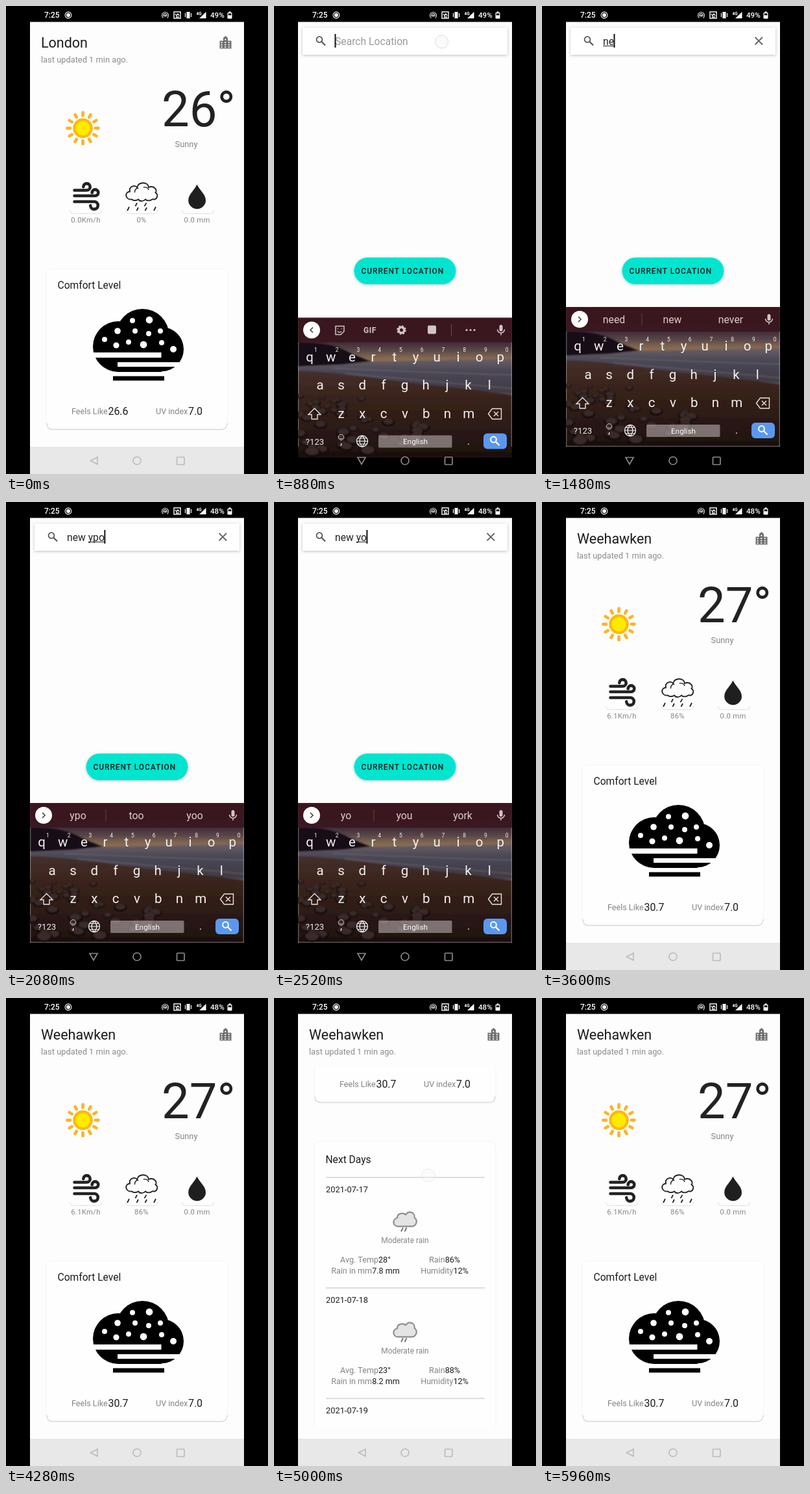
These frames come from a looping animation (404 px wide and 720 px high, 6000 ms). An HTML page:

```html
<!DOCTYPE html>
<html lang="en">
<head>
<meta charset="utf-8">
<title>Weather app</title>
<style>
  html, body { margin: 0; width: 100%; height: 100%; overflow: hidden; background: #000; }
  svg { display: block; width: 404px; height: 720px; font-family: Roboto, "Noto Sans", sans-serif; }
  text { white-space: pre; }
</style>
</head>
<body>
<svg id="stage" viewBox="0 0 404 720" xmlns="http://www.w3.org/2000/svg"></svg>
<script>
const LOOP = 6000;
const GREY = '#858585', INK = '#1c1c1c';

const text = (x, y, size, fill, body, extra = '') =>
  `<text x="${x}" y="${y}" font-size="${size}" fill="${fill}" ${extra}>${body}</text>`;
const mid = (x, y, size, fill, body, extra = '') => text(x, y, size, fill, body, `text-anchor="middle" ${extra}`);
const rect = (x, y, w, h, fill, extra = '') =>
  `<rect x="${x}" y="${y}" width="${w}" height="${h}" fill="${fill}" ${extra}/>`;
const circle = (x, y, r, fill, extra = '') => `<circle cx="${x}" cy="${y}" r="${r}" fill="${fill}" ${extra}/>`;
const line = (d, stroke, width, extra = '') =>
  `<path d="${d}" fill="none" stroke="${stroke}" stroke-width="${width}" ${extra}/>`;
const fillPath = (d, fill) => `<path d="${d}" fill="${fill}"/>`;
const group = (id, body, extra = '') => `<g id="${id}" ${extra}>${body}</g>`;
const range = (n, fn) => Array.from({ length: n }, (_, i) => fn(i)).join('');
const lens = (x, y, color, w = 1.8) =>
  circle(x - 1.5, y - 1.5, 4.4, 'none', `stroke="${color}" stroke-width="${w}"`) +
  line(`M${x + 2} ${y + 2}l5.500 5.500`, color, w + .3);

function statusBar() {
  return text(59, 18, 12, '#fff', '7:25', 'font-weight="500"') +
    circle(96, 14, 4.9, 'none', 'stroke="#fff" stroke-width="1.1"') + circle(96, 14, 3, '#fff') +
    line('M242.500 18.500a5 5 0 1 1 6 0M243.500 16a2.600 2.600 0 1 1 4 0', '#ddd', 1.2) + circle(245.5, 15, 1.3, '#fff') +
    rect(259, 9, 10, 10, 'none', 'stroke="#fff" stroke-width="1.4"') +
    line('M261 12l2 3 2-3 2 3M262 17h5', '#fff', 1.3) +
    rect(278.5, 9, 5, 10, '#fff') + line('M276.500 11v6M285.500 11v6', '#fff', 1.2) +
    fillPath('M298 19L308.500 9V19Z', '#fff') +
    text(293.5, 14, 6.5, '#fff', '4G', 'font-weight="700"') +
    text(315, 18, 11.6, '#fff', '49%', 'font-weight="500" id="battery"') +
    rect(341.5, 10, 7, 9.5, '#fff', 'rx="1"') + rect(343.5, 8.5, 3, 2, '#fff') +
    rect(342.7, 11.3, 4.6, 3, '#111');
}

function cityIcon() {
  const windows = range(3, r => range(3, c => rect(331.6 + c * 5.6, 55.3 + r * 3.5, 2, 1.8, '#fff')));
  return fillPath('M329.500 53.500H335V49L338.500 46L342 49V53.500H347.500V65.500H329.500Z', '#707070') +
    windows + rect(337.4, 50.5, 2, 2, '#fff');
}

function sun() {
  const rays = range(12, i => `<g transform="rotate(${i * 30} 118.500 188)">` +
    line('M118.500 168.500V164', '#fbb42c', 4.8, 'stroke-linecap="round"') + '</g>');
  return rays + circle(118.5, 188, 15.3, '#fdb913') + circle(118.5, 188, 11, '#ffea00');
}

function smallIcons() {
  const trays = [123, 209, 296].map(x =>
    line(`M${x - 25} 314q1 5.500 7 5.500h36q6 0 7-5.500`, '#e0e0e0', 1.1)).join('');
  const wind = line('M105.500 283.500H124.500a5.200 5.200 0 1 0-5.200-5.200M105.500 292H137.500a4.800 4.800 0 1 0-4.800-4.800' +
    'M105.500 301H136a5.800 5.800 0 1 1-5.800 6', '#222', 4.6, 'stroke-linecap="round"');
  const cloud = line('M194 297.500C184 299 182 286 191 285.500C189 277 199 275 202 279C205 269.500 219 270.500 220 279' +
    'C228 275.500 234 283 230.500 287C236 291 232.500 299 226 297.200C222 300 217 300 215 297.500C212 301 206 301 204 297.500C200 300 197 300 194 297.500Z', '#222', 1.9) +
    line('M198.500 287q0-7 6-7M212 279q7-1 8 4', '#222', 1.4) +
    line('M190 309l-3 6M202 303l-2.500 5M204 310l-2.500 5M216.500 303l-3 5M217 310l-2.500 5M231 309l-3 6', '#222', 1.7);
  const drop = fillPath('M294.500 274.500C298 283 308 289.500 308 299A13.400 13.200 0 0 1 281.200 299C281.200 289.500 291 283 294.500 274.500Z', '#1f1f1f');
  return trays + wind + cloud + drop;
}

function comfortCloud() {
  const dots = [[152, 513, 4], [172, 500, 4.8], [195, 484, 4], [221, 483, 5.4], [199, 500, 4], [238, 500, 4],
    [220, 504, 4], [170, 522, 4.6], [189, 517, 4], [212, 521, 5.4], [240, 518, 4], [258, 528, 5]];
  return circle(173, 524, 39, '#000') + circle(210.5, 507, 41, '#000') + circle(240, 528, 34, '#000') +
    rect(173, 520, 67, 43, '#000') + dots.map(d => circle(...d, '#fff')).join('') +
    rect(133, 533, 106.5, 8, '#fff') + rect(172, 548, 104, 7, '#fff') + rect(165, 569.5, 79, 6.8, '#000');
}

const card = (y, h) => rect(62, y, 280, h, '#fefefe', 'rx="9" stroke="#f4f4f4"') +
  line(`M63 ${y + h - 9}q0 9.500 9 9.500h260q9 0 9-9.500`, '#d9d9d9', 1.4);

const pair = (x, y, label, value) =>
  mid(x, y, 12.6, GREY, `${label}<tspan fill="${INK}">${value}</tspan>`);

function day(i, date, temp, mm, rain) {
  const y = 767 + i * 170;
  return rect(80, y - 1, 245, 1.6, '#d6d6d6') + text(80, y + 23, 12.85, INK, date) +
    `<path d="M191 ${y + 75}c-8 0-9-11-1-13c0-8 10-8 13-5c6-8 15-2 13.500 4.500c6 4 3 13.500-4 13.500Z" fill="#e4e4e4" stroke="#8f8f8f" stroke-width="2.2"/>` +
    line(`M199 ${y + 77}l-3 6M204.500 ${y + 77}l-3 6`, '#777', 1.9) +
    mid(202, y + 101, 11.9, GREY, 'Moderate rain') +
    pair(141, y + 131, 'Avg. Temp', temp) + pair(263, y + 131, 'Rain', rain) +
    pair(141, y + 148, 'Rain in mm', mm) + pair(263, y + 148, 'Humidity', '12%');
}

function weather() {
  const label = (id, x) => mid(x, 333, 11.24, GREY, '', `id="${id}" letter-spacing=".35"`);
  const content = sun() +
    text(240, 185, 76, '#222', '', 'id="temp"') + mid(278, 217, 12.85, GREY, 'Sunny') +
    smallIcons() + label('wind', 123) + label('rain', 209) + mid(294.5, 333, 11.24, GREY, '0.0 mm', 'letter-spacing=".35"') +
    card(404, 247) + text(79.5, 435, 15.6, INK, 'Comfort Level') + comfortCloud() +
    text(101, 628, 12.6, GREY, 'Feels Like') + text(157.5, 629, 15.9, INK, '', 'id="feels"') +
    text(231, 628, 12.6, GREY, 'UV index') + text(281, 629, 15.9, INK, '7.0') +
    card(711, 570) + text(79.5, 745, 15.6, INK, 'Next Days') +
    day(0, '2021-07-17', '28°', '7.8 mm', '86%') +
    day(1, '2021-07-18', '23°', '8.2 mm', '88%') +
    day(2, '2021-07-19', '25°', '4.1 mm', '82%');
  return text(54, 64, 21.5, INK, '', 'id="city"') + text(54, 86.5, 12.85, '#8c8c8c', 'last updated 1 min ago.') +
    cityIcon() + `<g clip-path="url(#scrollArea)">${group('content', content)}</g>`;
}

function search() {
  return rect(44, 33, 316, 42, '#fff', 'filter="url(#shadow)"') + lens(71.5, 53, '#555') +
    text(94, 59.5, 15.7, '#9a9a9a', 'Search Location', 'id="hint"') +
    text(94, 59.5, 15.7, '#222', '', 'id="query"') +
    rect(0, 61, 0, 1, '#222', 'id="underline"') + rect(93.5, 43, 2, 21, '#111', 'id="caret"') +
    line('M328.500 48l11.500 11.500M340 48l-11.500 11.500', '#666', 1.8, 'id="clear"') +
    rect(123.5, 387, 157, 41, '#06e5cf', 'rx="20.500" filter="url(#shadow)"') +
    text(134.5, 412, 11.9, '#0b1a1a', 'CURRENT LOCATION', 'font-weight="500" letter-spacing="1"');
}

// Dusk beach: low sun band, dark headland, wet sand and scattered stones
function beach() {
  let seed = 11;
  const rnd = () => (seed = seed * 16807 % 2147483647) / 2147483647;
  const rocks = range(44, i => {
    const y = 584 + i * 2, spread = y > 622 ? 190 : 110;
    const x = 40 + rnd() * spread, r = 4 + i * .12 + rnd() * 5;
    const oval = (dy, k, c) => `<ellipse cx="${x}" cy="${y + dy}" rx="${r * k}" ry="${r * .6 * k}" fill="${c}"/>`;
    return oval(0, 1, '#150d0d') + oval(-r * .14, .74, '#3a2b29');
  });
  const picture = rect(37, 463, 330, 215, 'url(#sky)') +
    fillPath('M37 533L367 526V580L37 552Z', 'url(#sea)') +
    fillPath('M37 501C70 500 95 505 112 514C125 521 138 525 150 530L105 535L37 538Z', '#181114') +
    fillPath('M37 545C100 546 150 556 200 562S320 574 367 582V678H37Z', 'url(#sand)') +
    line('M90 541Q210 546 367 551M110 549Q230 560 367 572', '#80757a', 1.5, 'opacity=".5"') + rocks;
  return `<g clip-path="url(#keys)"><g filter="url(#soft)">${picture}</g></g>` +
    rect(37, 463, 330, 38, '#3a161d', 'opacity=".85"');
}

function keyboard() {
  const key = (x, y, c, s = 20.5) => mid(x, y, s, '#f4f1ef', c);
  const row = (chars, x, step, y) => [...chars].map((c, i) => key(x + i * step, y, c)).join('');
  const digits = [...'1234567890'].map((c, i) => key(64.5 + i * 32.75, 515.5, c, 8.5)).join('');
  const pale = '#d0c6c6';
  const mic = rect(347.5, 474, 5, 10, pale, 'rx="2.500"') + line('M344.500 481a5.500 5.500 0 0 0 11 0M350 486.500v3.500', pale, 1.5);
  const gear = circle(196.5, 482, 4.3, 'none', `stroke="${pale}" stroke-width="3.500"`) +
    circle(196.5, 482, 6.3, 'none', `stroke="${pale}" stroke-width="2" stroke-dasharray="2.600 2.350"`);
  const tools = line('M60 478l-4 4 4 4', '#444', 1.7) +
    line('M95 476h13v8l-5 5h-8ZM98 480h1M104 480h1M98 484q3 3 6 0', pale, 1.5) +
    mid(148, 486.5, 12, pale, 'GIF', 'font-weight="700" letter-spacing=".5"') + gear +
    rect(237, 475, 13, 13, pale, 'rx="2"') + rect(273, 473, 1, 18, '#6b4f54') +
    [297, 303, 309].map(x => circle(x, 482, 1.6, pale)).join('');
  const words = line('M56 478l4 4-4 4', '#444', 1.7) + rect(153.5, 473, 1, 18, '#604449') +
    [111, 201, 291].map((x, i) => mid(x, 487.5, 15.8, '#d8cece', '', `id="word${i}"`)).join('');
  return beach() + circle(58, 482, 13, '#fff') + group('tools', tools) + group('words', words) + mic +
    row('qwertyuiop', 55, 32.7, 530) + digits + row('asdfghjkl', 71, 32.65, 573.5) + row('zxcvbnm', 103.5, 32.8, 617) +
    line('M62.500 602.500l9.500 9.500h-5v7h-9v-7h-5Z', '#e8e3e1', 1.4) +
    line('M330.500 611l6-8h14v16h-14ZM339 607.500l7 7M346 607.500l-7 7', '#e8e3e1', 1.4) +
    key(63, 658, '?123', 13.2) + key(103.5, 658, ',', 16) +
    circle(103.5, 647, 4.2, 'none', 'stroke="#e8e3e1"') + line('M101 648q2.500 3 5 0M102 645.500v1M105 645.500v1', '#e8e3e1', 1) +
    circle(136, 653, 8.5, 'none', 'stroke="#eee" stroke-width="1.400"') +
    line('M127.500 653h17M129.500 648.500h13M129.500 657.500h13M136 644.500q-8 8.500 0 17q8-8.500 0-17', '#eee', 1.2) +
    rect(161, 644, 113.5, 19, '#b9aeae', 'rx="1.500" opacity=".6"') + mid(218, 657.5, 11.8, '#fff', 'English') +
    key(300, 658, '.', 17) + rect(323, 641, 36, 24, '#5a98f0', 'rx="6"') + lens(340, 652, '#fff', 2);
}

const navIcons = (id, color, triangle) => group(id,
  line(triangle, color, 1.7) + circle(202, 699.5, 6, 'none', `stroke="${color}" stroke-width="1.700"`) +
  rect(263.5, 694, 11.5, 11.5, 'none', `rx="1" stroke="${color}" stroke-width="1.700"`));

const gradient = (id, ...stops) => `<linearGradient id="${id}" x1="0" y1="0" x2="0" y2="1">` +
  stops.map(([at, c]) => `<stop offset="${at}" stop-color="${c}"/>`).join('') + '</linearGradient>';

document.getElementById('stage').innerHTML = `<defs>
  <clipPath id="scrollArea"><rect x="37" y="106" width="330" height="554"/></clipPath>
  <clipPath id="keys"><rect x="37" y="463" width="330" height="215"/></clipPath>
  <filter id="soft"><feGaussianBlur stdDeviation="1"/></filter>
  <filter id="shadow" x="-10%" y="-20%" width="120%" height="150%"><feDropShadow dx="0" dy="1" stdDeviation="2" flood-opacity=".25"/></filter>
  ${gradient('sky', [0, '#3a161d'], [.17, '#3d2a34'], [.23, '#57454a'], [.29, '#86694f'], [.33, '#8c7257'], [.4, '#5d5560'])}
  ${gradient('sea', [0, '#6b6066'], [.35, '#4a4856'], [1, '#3f3a44'])}
  ${gradient('sand', [0, '#45302b'], [.3, '#3a241b'], [.7, '#2a1914'], [1, '#1c100f'])}
  </defs>` +
  rect(0, 0, 404, 720, '#000') + rect(37, 24.5, 330, 653.5, '#fdfdfd') + statusBar() +
  group('weather', weather()) + group('search', search()) +
  group('lightNav', rect(37, 678, 330, 42, '#e8e8e8') + navIcons('lightIcons', '#bcbcbc', 'M141 694v11l-10.500-5.500Z')) +
  group('darkNav', rect(37, 678, 330, 42, '#000') + group('keyboard', keyboard()) +
    navIcons('darkIcons', '#8b8888', 'M129 694.500h12l-6 10.500Z')) +
  circle(0, 0, 10, '#f6f6f6', 'id="touch" stroke="#b5b5b5" stroke-width="1"');

const ui = {};
document.querySelectorAll('#stage [id]').forEach(e => ui[e.id] = e);

const show = (e, on) => e.setAttribute('display', on ? 'inline' : 'none');
const put = (id, value) => { if (ui[id].textContent !== value) ui[id].textContent = value; };
const clamp = v => Math.min(1, Math.max(0, v));
const at = (steps, t) => steps.filter(s => s[0] <= t).pop();
function track(points, t) {
  const i = points.findIndex(p => p[0] > t);
  if (i < 0) return points[points.length - 1][1];
  if (!i) return points[0][1];
  const [t0, a] = points[i - 1], [t1, b] = points[i];
  return a + (b - a) * (t - t0) / (t1 - t0);
}

const OPEN = 520, KEYS_UP = 760, KEYS_DOWN = 3080, RESULT = 3480;
const typing = [
  [0, '', '', '', ''],
  [1260, 'n', 'no', 'not', 'now'], [1400, 'ne', 'need', 'new', 'never'], [1520, 'new', 'new', 'news', 'newer'],
  [1680, 'new ', 'one', 'year', 'phone'], [1840, 'new y', 'year', 'you', 'york'], [1960, 'new yp', 'up', 'yo', 'yep'],
  [2040, 'new ypo', 'ypo', 'too', 'yoo'], [2240, 'new yp', 'up', 'yo', 'yep'], [2340, 'new y', 'year', 'you', 'york'],
  [2460, 'new yo', 'yo', 'you', 'york'], [2560, 'new yor', 'yor', 'york', 'your'], [2660, 'new york', 'york', 'yorks', 'yorke'],
  [2780, 'new york ', 'in', 'time', 'city'],
];
const scroll = [[4400, 0], [4470, 110], [4580, 235], [4740, 265], [4860, 400], [4960, 477], [5000, 490], [5120, 575],
  [5220, 600], [5340, 600], [5440, 450], [5540, 300], [5640, 150], [5740, 35], [5820, 0]];
// Start, end, x, first y, last y
const touches = [[320, 460, 338, 57, 57], [680, 850, 258.5, 55, 55], [2940, 3060, 346, 650, 650],
  [4390, 4560, 238, 560, 330], [4760, 4950, 238, 500, 273], [5350, 5560, 238, 250, 540]];

function drawTouch(t) {
  const hit = touches.find(([a, b]) => t >= a && t < b + 80);
  show(ui.touch, hit);
  if (!hit) return;
  const [a, b, x, y0, y1] = hit;
  ui.touch.setAttribute('cx', x);
  ui.touch.setAttribute('cy', y0 + (y1 - y0) * clamp((t - a) / (b - a)));
  ui.touch.setAttribute('opacity', .75 * (1 - clamp((t - b) / 80)));
}

function drawSearch(t) {
  const [, query, ...words] = at(typing, t);
  put('query', query);
  words.forEach((w, i) => put('word' + i, w));
  show(ui.tools, !query);
  show(ui.words, query);
  show(ui.hint, !query);
  show(ui.clear, query);
  const end = 94 + (query ? ui.query.getComputedTextLength() : 0);
  const start = query.lastIndexOf(' ') + 1;
  const from = start && start < query.length ? 94 + ui.query.getSubStringLength(0, start) : 94;
  const composing = query && start < query.length;
  ui.underline.setAttribute('x', from);
  ui.underline.setAttribute('width', composing ? end - from : 0);
  ui.caret.setAttribute('x', end - .5);
  show(ui.caret, t >= KEYS_UP && t < 2900);
  const rise = 1 - clamp((t - KEYS_UP) / 205), fall = clamp((t - KEYS_DOWN) / 120);
  ui.keyboard.setAttribute('transform', `translate(0 ${240 * (rise ** 3 + fall ** 2)})`);
}

function render(t) {
  const searching = t >= OPEN && t < RESULT;
  const keys = t >= KEYS_UP && t < KEYS_DOWN + 120;
  const later = t >= RESULT;
  show(ui.search, searching);
  show(ui.weather, !searching);
  show(ui.darkNav, keys);
  show(ui.lightNav, !keys);
  put('battery', t < 1640 ? '49%' : '48%');
  put('city', later ? 'Weehawken' : 'London');
  put('temp', later ? '27°' : '26°');
  put('wind', later ? '6.1Km/h' : '0.0Km/h');
  put('rain', later ? '86%' : '0%');
  put('feels', later ? '30.7' : '26.6');
  ui.content.setAttribute('transform', `translate(0 ${-track(scroll, t)})`);
  if (searching) drawSearch(t);
  drawTouch(t);
}

const begin = performance.now();
function tick() {
  render((performance.now() - begin) % LOOP);
  requestAnimationFrame(tick);
}
tick();
</script>
</body>
</html>
```
